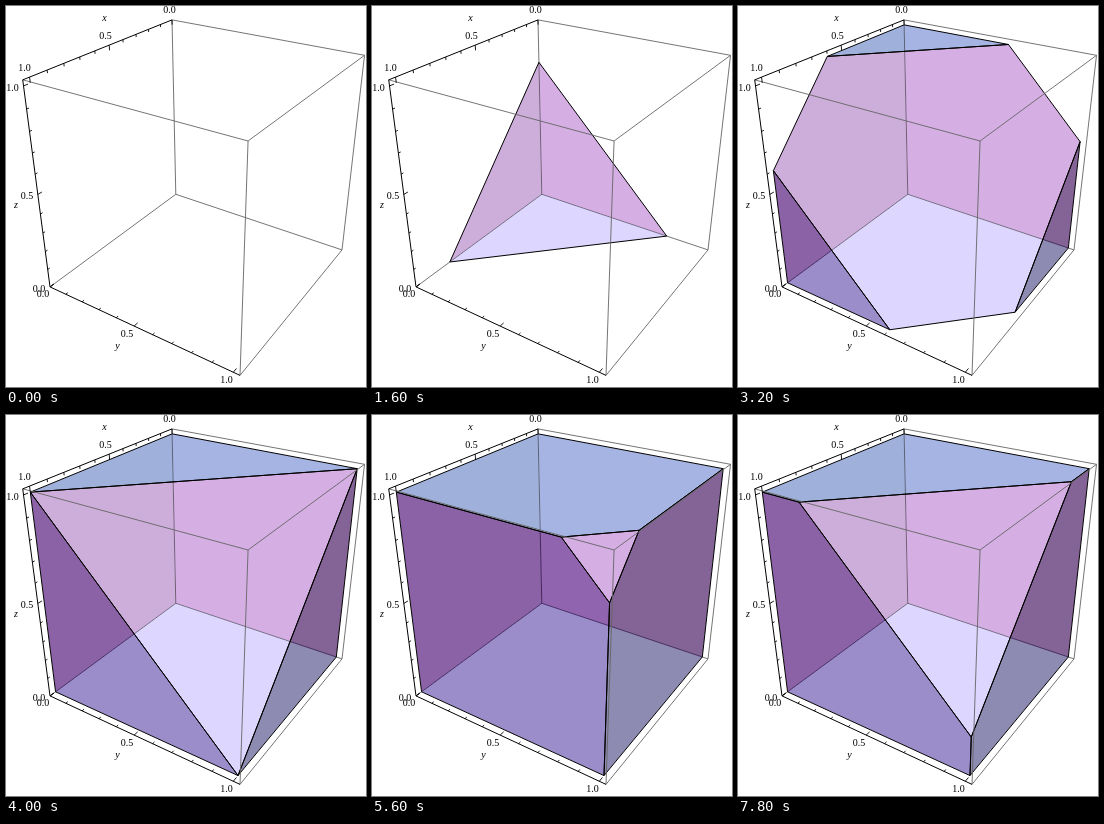
These frames come from a looping animation (360x381 px, 8 s). An HTML page with a canvas:

```html
<!DOCTYPE html>
<html>
<head>
<meta charset="utf-8">
<style>
  html, body { margin: 0; width: 100%; height: 100%; overflow: hidden; background: #fff; }
  canvas { display: block; width: 360px; height: 381px; }
</style>
</head>
<body>
<canvas id="stage"></canvas>
<script>
const W = 360, H = 381;
const canvas = document.getElementById('stage');
const ctx = canvas.getContext('2d');
const dpr = window.devicePixelRatio || 1;
canvas.width = W * dpr;
canvas.height = H * dpr;

// Perspective given by the screen places and relative depths of four box corners.
const ORIGIN = [169.8, 188.3];
const AXES = [
  { at: [44, 280.9], w: 0.807 },
  { at: [336, 243.9], w: 0.874 },
  { at: [166, 13.9], w: 0.878 }
];
// Size of the unit cube inside the slightly larger box.
const FIT = [0.964, 0.97, 0.975];

function project(p) {
  let x = ORIGIN[0], y = ORIGIN[1], w = 1;
  AXES.forEach((axis, i) => {
    x += p[i] * (axis.w * axis.at[0] - ORIGIN[0]);
    y += p[i] * (axis.w * axis.at[1] - ORIGIN[1]);
    w += p[i] * (axis.w - 1);
  });
  return [x / w, y / w];
}

const projectUnit = p => project(p.map((v, i) => v * FIT[i]));
const sum = p => p[0] + p[1] + p[2];
const mix = (a, b, t) => a.map((v, i) => v + (b[i] - v) * t);

// Square face of the unit cube where coordinate `axis` equals `value`.
function face(axis, value) {
  return [[0, 0], [1, 0], [1, 1], [0, 1]].map(([u, v]) => {
    const p = [0, 0, 0];
    p[axis] = value;
    p[(axis + 1) % 3] = u;
    p[(axis + 2) % 3] = v;
    return p;
  });
}

// Part of a polygon with x + y + z <= s.
function below(poly, s) {
  const out = [];
  poly.forEach((a, i) => {
    const b = poly[(i + 1) % poly.length];
    const da = s - sum(a), db = s - sum(b);
    if (da >= 0) out.push(a);
    if (da * db < 0) out.push(mix(a, b, da / (da - db)));
  });
  return out;
}

// Section of the unit cube with the plane x + y + z = s, as screen points in order.
function section(s) {
  const pts = [];
  for (let axis = 0; axis < 3; axis++) {
    for (const start of face(axis, 0)) {
      const t = s - sum(start);
      if (t < 0 || t > 1) continue;
      const p = start.slice();
      p[axis] = t;
      pts.push(projectUnit(p));
    }
  }
  const cx = pts.reduce((n, p) => n + p[0], 0) / pts.length;
  const cy = pts.reduce((n, p) => n + p[1], 0) / pts.length;
  const angle = p => Math.atan2(p[1] - cy, p[0] - cx);
  return pts.sort((a, b) => angle(a) - angle(b));
}

function trace(pts, closed) {
  ctx.beginPath();
  pts.forEach(p => ctx.lineTo(p[0], p[1]));
  if (closed) ctx.closePath();
}

function line(a, b, color, width) {
  trace([a, b]);
  ctx.strokeStyle = color;
  ctx.lineWidth = width;
  ctx.stroke();
}

function clipped(pts, paint) {
  ctx.save();
  trace(pts, true);
  ctx.clip();
  paint();
  ctx.restore();
}

// Each surface: its tints over the back faces x = 0, y = 0 and z = 0,
// and the ink of back edges seen through it.
const PALE_INK = 'rgba(0,0,0,0.4)', DARK_INK = 'rgba(35,5,60,0.65)';
const CUT = { tints: ['#d5aee4', '#cdadd9', '#ddd6ff'], ink: PALE_INK };
const FRONTS = [
  { tints: ['#9164af', '#8a62a5', '#9b8cca'], ink: DARK_INK },
  { tints: ['#846396', '#7d618e', '#8e8bb2'], ink: DARK_INK },
  { tints: ['#a6b4e4', '#9fb1db', '#adbcee'], ink: PALE_INK }
];
const BACKS = [0, 1, 2].map(axis => face(axis, 0).map(projectUnit));

function paintSurface(pts, { tints, ink }, s) {
  if (pts.length < 3) return;
  BACKS.forEach((back, i) => clipped(back, () => {
    trace(pts, true);
    ctx.fillStyle = tints[i];
    ctx.fill();
  }));
  clipped(pts, () => {
    for (let axis = 0; axis < 3; axis++) {
      const end = [0, 0, 0];
      end[axis] = Math.min(s, 1);
      line(ORIGIN, projectUnit(end), ink, 1);
    }
  });
}

function outline(pts) {
  if (pts.length < 3) return;
  trace(pts, true);
  ctx.strokeStyle = '#000';
  ctx.lineWidth = 1;
  ctx.stroke();
}

function drawBody(s) {
  if (s <= 0) return;
  const fronts = [0, 1, 2].map(axis => below(face(axis, 1), s).map(projectUnit));
  const cut = section(s);
  fronts.forEach((pts, i) => paintSurface(pts, FRONTS[i], s));
  paintSurface(cut, CUT, s);
  fronts.forEach(outline);
  outline(cut);
}

function boxEdge(a, b) {
  line(project(a), project(b), '#666', 0.9);
}

// Axis along coordinate `axis` from `base`, with ticks pointing to `inward`.
function drawAxis(axis, base, inward) {
  const at = v => base.map((c, i) => i === axis ? v : c);
  line(project(at(0)), project(at(1)), '#000', 1);
  for (let i = 0; i <= 10; i++) {
    const p = at(i / 10 * FIT[axis]);
    const len = i % 5 ? 0.013 : 0.024;
    line(project(p), project(p.map((c, j) => c + inward[j] * len)), '#000', 0.9);
  }
}

const LABELS = [
  ['0.0', 163.5, 7], ['0.5', 99.5, 33], ['1.0', 18.5, 65],
  ['1.0', 6.5, 85], ['0.5', 21, 193], ['0.0', 33, 286],
  ['0.0', 37, 291], ['0.5', 121, 331], ['1.0', 220.5, 377]
];
const NAMES = [['x', 98.5, 15], ['y', 111.5, 343], ['z', 10, 202]];

function drawText() {
  const font = '10px "Liberation Serif", Times, serif';
  ctx.fillStyle = '#000';
  ctx.textAlign = 'center';
  ctx.font = font;
  LABELS.forEach(label => ctx.fillText(...label));
  ctx.font = 'italic ' + font;
  NAMES.forEach(name => ctx.fillText(...name));
}

function draw(s) {
  ctx.setTransform(dpr, 0, 0, dpr, 0, 0);
  ctx.fillStyle = '#fff';
  ctx.fillRect(0, 0, W, H);
  ctx.lineJoin = 'round';

  [[1, 0, 0], [0, 1, 0], [0, 0, 1]].forEach(p => boxEdge([0, 0, 0], p));
  drawBody(s);
  [[0, 1, 1], [1, 0, 1], [1, 1, 0]].forEach(p => boxEdge([1, 1, 1], p));
  boxEdge([0, 1, 0], [1, 1, 0]);
  boxEdge([0, 1, 0], [0, 1, 1]);
  boxEdge([0, 0, 1], [0, 1, 1]);

  drawAxis(0, [0, 0, 1], [0, 0, -1]);
  drawAxis(1, [1, 0, 0], [-1, 0, 0]);
  drawAxis(2, [1, 0, 0], [-1, 0, 0]);
  drawText();
}

// The level climbs by 0.1 to 3, rests one step, then descends.
const STEP = 200, LOOP = 8000, TOP = 30;
const begin = performance.now();

function tick() {
  const time = Math.max(0, performance.now() - begin) % LOOP;
  const n = Math.floor(time / STEP);
  const level = n <= TOP ? n : 2 * TOP + 1 - n;
  draw(level / 10);
  requestAnimationFrame(tick);
}
tick();
</script>
</body>
</html>
```
